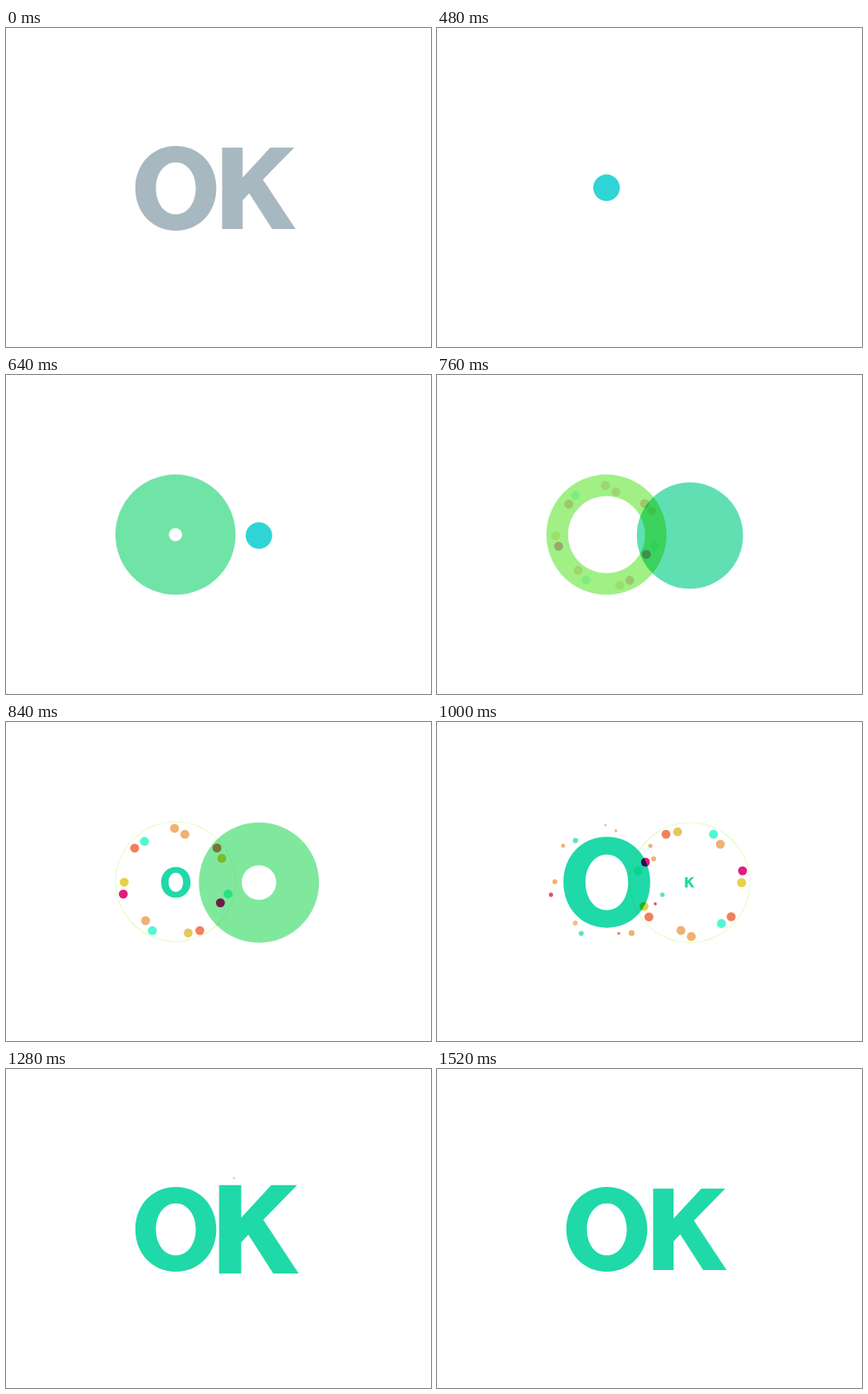
Write an HTML page with a canvas that moves like this. It is 512 px wide and 384 px high and loops after 2.44 s.

```html
<!DOCTYPE html>
<html lang="en">
<head>
<meta charset="utf-8">
<title>OK</title>
<style>
  html, body { margin: 0; width: 100%; height: 100%; overflow: hidden; background: #fff; }
  canvas { display: block; }
</style>
</head>
<body>
<canvas id="stage" width="512" height="384" role="img" aria-label="OK"></canvas>
<script>
const ctx = document.getElementById('stage').getContext('2d');
const LOOP = 2440, STEP = 40, START = 480;
const GREY = '#a8b8c1', TEAL = '#20d9a8';

const COLORS = {
  orange: [240, 177, 115],
  pale: [244, 190, 140],
  coral: [240, 128, 94],
  yellow: [234, 208, 68],
  gold: [229, 200, 96],
  aqua: [80, 248, 212],
  mint: [92, 228, 190],
  magenta: [228, 28, 124],
  rose: [224, 82, 108]
};

// x, y, drift x, drift y, lifetime in ms, first colour, last colour
const DOTS = [
  [-1.2, -64.6, 0, -4, 200, 'orange', 'pale'],
  [11.3, -57.4, 0, -4.3, 211, 'orange', 'pale'],
  [49.9, -41, 3, -2.5, 245, 'coral', 'orange'],
  [55.8, -28.4, 1, .5, 279, 'yellow', 'orange'],
  [63.3, 14.4, 4, 1, 257, 'aqua', 'mint'],
  [54.1, 25, 4.7, 1.3, 211, 'magenta', 'rose'],
  [29.3, 58.5, 1, 3, 328, 'coral', 'orange'],
  [15.3, 61.4, -.5, .5, 211, 'gold', 'coral'],
  [-27.9, 58.5, -2.5, 3.5, 279, 'aqua', 'mint'],
  [-36.1, 46.5, -1.5, 3, 279, 'orange', 'pale'],
  [-62.9, 14.5, -4, .8, 245, 'magenta', 'rose'],
  [-61.8, .2, -.4, -.6, 271, 'yellow', 'orange'],
  [-49.2, -40.8, -3, -2.8, 240, 'coral', 'orange'],
  [-37.4, -48.9, 0, -1, 285, 'aqua', 'mint']
];

const clamp = v => Math.max(0, Math.min(1, v));
const rgb = c => `rgb(${c.map(Math.round).join()})`;
const mix = (a, b, k) => rgb(a.map((v, i) => v + (b[i] - v) * k));

// Closed oval, a little squarer than an ellipse
function oval(rx, ry, k = .575) {
  const a = rx * k, b = ry * k;
  return `M0 ${-ry}C${a} ${-ry} ${rx} ${-b} ${rx} 0S${a} ${ry} 0 ${ry}` +
    `S${-rx} ${b} ${-rx} 0S${-a} ${-ry} 0 ${-ry}Z`;
}

const LETTERS = [
  {
    x: 204.6, y: 193, cx: 204.2, cy: 192.2, dotX: 204.2, dotY: 192.6,
    turn: 1, delay: 0, pop: 341,
    path: new Path2D(oval(48.8, 51) + oval(24, 31.3))
  },
  {
    x: 304.4, y: 193, cx: 304.7, cy: 193.3, dotX: 305.2, dotY: 193.6,
    turn: -1, delay: 160, pop: 354,
    path: new Path2D('M-44-49H-19.4V-13L14-49H42.8L5.1-10.5L44.5 49H16.2L-11.4 6L-19.4 14.5V49H-44Z')
  }
];

// Cubic bezier easing with overshoot, solved by bisection
function popEase(x) {
  if (x <= 0) return 0;
  if (x >= 1) return 1;
  const curve = (s, a, b) => 3 * (1 - s) ** 2 * s * a + 3 * (1 - s) * s * s * b + s ** 3;
  let lo = 0, hi = 1;
  for (let i = 0; i < 24; i++) {
    const mid = (lo + hi) / 2;
    if (curve(mid, .1, .2) < x) lo = mid; else hi = mid;
  }
  return curve(lo, 1, 1.25);
}

function drawLetter(l, scale, color) {
  if (scale <= 0) return;
  ctx.save();
  ctx.translate(l.x, l.y);
  ctx.scale(scale, scale);
  ctx.fillStyle = color;
  ctx.fill(l.path, 'evenodd');
  ctx.restore();
}

function drawBubble(l, t) {
  const r = Math.min(72.4, 16 + .4 * t);
  const hole = Math.max(0, .32 * (t - 135));
  if (t < 0 || hole >= r) return;
  ctx.fillStyle = rgb([48 + .4 * t, 212 + .1 * t, 212 - .28 * t]);
  ctx.beginPath();
  ctx.arc(l.cx, l.cy, r, 0, 7);
  if (hole) {
    ctx.moveTo(l.cx + hole, l.cy);
    ctx.arc(l.cx, l.cy, hole, 0, 7);
  }
  ctx.fill('evenodd');
}

function drawDots(l, t) {
  const age = t - 360;
  if (age < -80) return;
  const drift = (1 - Math.exp(-age / 120)) / (1 - Math.exp(-160 / 120));
  ctx.globalAlpha = clamp((age + 100) / 60);
  for (const [x, y, dx, dy, life, from, to] of DOTS) {
    const r = 5.4 * (1 - clamp(age / life) ** 1.5);
    if (r <= 0) continue;
    ctx.fillStyle = mix(COLORS[from], COLORS[to], clamp(age / 160));
    ctx.beginPath();
    ctx.arc(l.dotX + l.turn * (x + dx * drift), l.dotY + l.turn * (y + dy * drift), r, 0, 7);
    ctx.fill();
  }
  ctx.globalAlpha = 1;
}

function draw(time) {
  ctx.globalCompositeOperation = 'source-over';
  ctx.fillStyle = '#fff';
  ctx.fillRect(0, 0, 512, 384);
  ctx.globalCompositeOperation = 'multiply';
  for (const l of LETTERS) {
    if (time < START) {
      drawLetter(l, 1, GREY);
      continue;
    }
    const t = time - START - l.delay;
    drawBubble(l, t);
    drawDots(l, t);
    drawLetter(l, popEase((t - l.pop) / 450), TEAL);
  }
}

function tick() {
  const time = performance.now() % LOOP;
  draw(Math.floor(time / STEP) * STEP);
  requestAnimationFrame(tick);
}
tick();
</script>
</body>
</html>
```
